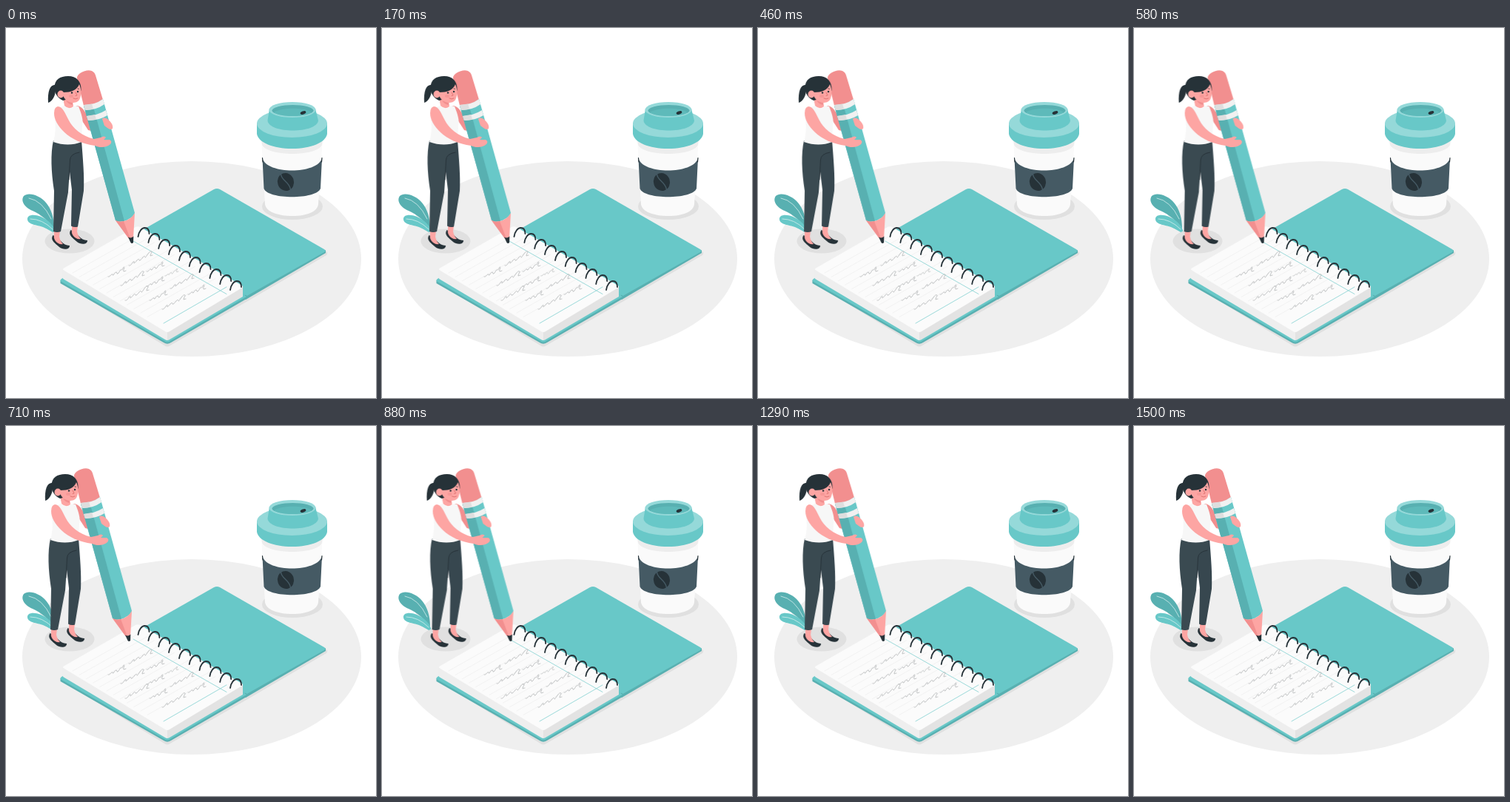
An HTML page without scripts that plays this animation: 500 px wide and 500 px high, repeating every 1540 ms.

```html
<!DOCTYPE html>
<html lang="en">
<head>
<meta charset="utf-8">
<title>Writing in a notebook</title>
<style>
  html, body { margin: 0; width: 100%; height: 100%; overflow: hidden; background: #fff; }
  svg { display: block; width: 100%; height: 100%; }

  .teal { fill: #68c8c8; }
  .teal-dark { fill: #58b0b1; }
  .teal-light { fill: #95d9d9; }
  .ink { fill: #263238; }
  .skin { fill: #fda5a3; }
  .skin-dark { fill: #f28f8f; }
  .shadow { fill: #e0e0e0; }
  .line { fill: none; stroke-linecap: round; stroke-linejoin: round; }
  .ring { stroke: #263238; stroke-width: 1.8; }
  .script { stroke: #c2c4c5; stroke-width: 1; }
  .rule { stroke: #eeeeee; stroke-width: .7; }
  .margin { stroke: #9bdada; stroke-width: 1; }

  .writer { animation: shake 1540ms ease-in-out infinite; }

  @keyframes shake {
    0%, 94.7%, 100% { transform: translateX(0); }
    7%, 85% { transform: translateX(-1px); }
    16.8%, 75.2% { transform: translateX(2px); }
    26.5%, 46%, 65.5% { transform: translateX(-4px); }
    36.2%, 55.7% { transform: translateX(4px); }
  }
</style>
</head>
<body>
<svg viewBox="0 0 500 500">
  <defs>
    <path id="long" class="line script" d="M0 0c2 1 4-2 5-4s3-2 2 0 2 0 4-3 3-1 3 0 3-1 5-4 3-1 3 0 2-2 4-5 4-4 5-3-2 3-2 6q2-1 3-1"/>
    <path id="short" class="line script" d="M0 0c2 1 3-2 5-3s1 2 2 1 2-4 4-4 0 3 2 2 2-4 4-5 2 1 3-2 2-2 2-1-2 3-1 5l3-1"/>
    <path id="ring" class="line ring" d="M0 0C1-7 5-12 9-12S15-9 15-4"/>
    <path id="rule" class="line rule" d="M90 331L182 279"/>
    <g id="rules3">
      <use href="#rule"/>
      <use href="#rule" x="9.2" y="5.4"/>
      <use href="#rule" x="18.4" y="10.8"/>
    </g>
    <g id="foot">
      <path class="ink" d="M63.500 280C59 287 67 291 72 296C77 300 86 300 86 294C80 294 75 290 71 284Z"/>
      <path class="skin" d="M65 272L73 274L72 282C73 287 75 290 77 292Q71 293 67 288Q64 284 65 280Z"/>
    </g>
  </defs>

  <ellipse cx="251" cy="312" rx="229" ry="132" fill="#efefef"/>

  <!-- Plant -->
  <path class="teal-dark" d="M65 271C65 256 61 244 54 236C46 226 30 221 24 227C19 234 26 243 36 247C47 252 57 260 65 271Z"/>
  <path class="teal" d="M67 278C66 267 57 259 47 255C38 251 28 252 29 259C30 266 42 266 50 269C57 272 61 275 67 278Z"/>
  <path class="line" stroke="#d5eeee" stroke-width=".8" d="M31 230Q49 233 61 258M33 258Q49 258 63 272"/>
  <ellipse class="shadow" cx="86" cy="288" rx="33.5" ry="16.5"/>

  <!-- Cup -->
  <g>
    <ellipse class="shadow" cx="387" cy="241" rx="41" ry="18"/>
    <path fill="#fafafa" d="M345 148L350 238C351 248 367 254 387 254S421 248 422 238L428 148Z"/>
    <path fill="#ededed" d="M345 150L346 158C354 174 420 174 427 158L428 150Z"/>
    <path fill="#455a64" d="M346.500 176C352 198 421 198 427 176L425 217C419 232 354 232 348.500 217Z"/>
    <path class="line" stroke="#263238" stroke-width="1.200" d="M346.500 175.500L347 181M427 175.500L426.500 181"/>
    <g transform="rotate(-18 378 208)">
      <ellipse class="ink" cx="378" cy="208" rx="11" ry="12"/>
      <path class="line" stroke="#455a64" stroke-width="1.500" d="M375 196C373 205 383 209 381 220"/>
    </g>
    <path class="teal" d="M339 128V143C341 155 361 163 386.500 163S432 155 434 143V128Z"/>
    <ellipse class="teal-light" cx="386.500" cy="129" rx="47.500" ry="19"/>
    <path class="teal" d="M356 109L353.500 125C355 143 420 143 422 125L418 109Z"/>
    <ellipse class="teal-light" cx="387" cy="110.500" rx="31.500" ry="10.500"/>
    <ellipse class="teal-dark" cx="387.500" cy="111.500" rx="28" ry="7.500"/>
    <path class="teal" d="M362 114C372 107 404 107 413 114C404 121 371 121 362 114Z" opacity=".4"/>
    <ellipse class="ink" cx="401.500" cy="114.500" rx="4" ry="2" transform="rotate(-20 401.500 114.500)"/>
  </g>

  <!-- Notebook -->
  <g>
    <path class="shadow" d="M74 344L214 429Q218 432 222 429L325 370L433 307Q436 304 432 301L320 360Z"/>
    <path class="teal-dark" d="M186 272L320 360L432 300V304L324 367L318 363Z"/>
    <path class="teal" d="M186 272L281 218Q285 216 289 218L430 299Q433 301 430 303L322 364Z"/>
    <path class="teal-dark" d="M73.500 341V345L213 425Q218 428.500 223 425L325 366V361Z"/>
    <path class="teal" d="M78 337L75 339Q72 341 75 343L214 423Q218 426 222 423L325 363L318 358Z"/>
    <path fill="#eeeeee" d="M76.500 326V337Q76.500 338.500 78 339.500L215 421Q216.500 422 218 422V410Z"/>
    <path fill="#e3e3e3" d="M218 410V422Q219.500 422 221 421L320 363V349Z"/>
    <path fill="#fbfbfb" d="M79 324L175 269Q179 267 183 270L319 348Q321 350 319 351L221 410Q218 412 215 410L79 328Q75 326 79 324Z"/>
    <use href="#rules3"/>
    <use href="#rules3" x="27.600" y="16.200"/>
    <use href="#rules3" x="55.200" y="32.400"/>
    <use href="#rules3" x="82.800" y="48.600"/>
    <path class="line margin" d="M172 288L298 359.500M213 399L298 350"/>
    <use href="#short" x="138" y="336"/>
    <use href="#long" x="166" y="321"/>
    <use href="#long" x="155" y="348"/>
    <use href="#short" x="190" y="329"/>
    <use href="#long" x="161" y="368"/>
    <use href="#short" x="190" y="349"/>
    <use href="#short" transform="translate(215 335) scale(.75)"/>
    <use href="#short" x="194" y="368"/>
    <use href="#long" x="222" y="352"/>
    <use href="#long" x="211" y="380"/>
    <use href="#short" x="246" y="360"/>
    <use href="#ring" x="178.500" y="282"/>
    <use href="#ring" x="192.400" y="290"/>
    <use href="#ring" x="206.200" y="298"/>
    <use href="#ring" x="220" y="306"/>
    <use href="#ring" x="234" y="314"/>
    <use href="#ring" x="247.700" y="322"/>
    <use href="#ring" x="261.500" y="330"/>
    <use href="#ring" x="275.400" y="338"/>
    <use href="#ring" x="289.200" y="346"/>
    <use href="#ring" x="303" y="354"/>
  </g>

  <g class="writer">
    <!-- Far arm -->
    <path class="skin-dark" d="M95 105C103 105 107 113 111 121L119 140L111 138L100 121Z"/>

    <!-- Pencil -->
    <path class="skin-dark" d="M96 68C95 62 108 55 116 58Q120 60 121 64L131 97Q119 106 105 105Z"/>
    <path class="teal" d="M105 105Q121 104 131 96L174 250Q171 256 166 258Q161 262 156 261Q151 263 148 260Z"/>
    <path class="teal-dark" d="M105 105L117 103L160 261Q151 263 148 260Z"/>
    <path fill="#f1f1f1" d="M105 104Q120 104 131 96L133 103Q122 111 107 111ZM109 119Q124 118 135 111L137 118Q126 125 111 125Z"/>
    <path fill="#dedede" d="M105 104L116 102.500L118 109.500L107 111ZM109 119L120 117L122 123.500L111 125Z"/>
    <path class="skin" d="M148 260Q153 263 159 261Q169 259 174 250L172 284L165.500 284Z"/>
    <path class="skin-dark" d="M148 260Q153 263 159 261L168 285L165.500 284Z"/>
    <path class="ink" d="M165 282.500Q169 285 172.300 281.500L172 290Q170 292 168.500 290Z"/>

    <!-- Far hand -->
    <path class="skin" d="M130 123C133 119 139 124 142 128Q145 132 144 136Q141 138.500 137 135L133 132Z"/>

    <!-- Legs -->
    <use href="#foot" x="24" y="-7"/>
    <use href="#foot"/>
    <path fill="#37474f" d="M80 153L102 152C104 178 106 200 105 220L97 268.500Q92 270 88 267.500L89 219L85 186Z"/>
    <path fill="#3a4a51" d="M64 152Q82 158 101 153L99 168Q87 170 87 178L84 222L74 275Q69 277 64 275L65 220C61 194 60 170 64 152Z"/>
    <path class="line" stroke="#263238" stroke-width=".9" d="M99 168Q87 170 86.500 178L85 205"/>

    <!-- Torso -->
    <path fill="#f7f7f7" d="M72 108L78 105Q86 112 93 105L98 106C102 116 105 125 103 132L102 154Q84 161 64 154C68 140 67 127 65 117Z"/>
    <path class="skin" d="M77 94L90 98L91 106Q85 111 79 105Z"/>
    <path class="skin-dark" d="M81 98L90 101V104Q84 103 81 98Z"/>

    <!-- Head -->
    <path class="ink" d="M69 77C60 75 56 84 57 101C63 99 67 91 67 83Z"/>
    <path class="ink" d="M65.500 80C65.500 70 73 65 84 65C95 65 102 72 101.500 84L98 92L77 98C69 94 65.500 88 65.500 80Z"/>
    <path class="skin" d="M77 87C88 87 96 84 99 76C102 83 102 90 100 95C98 101 91 102 86 100C80 98 77 93 77 89Z"/>
    <ellipse class="skin" cx="74" cy="89.500" rx="4.500" ry="5"/>
    <ellipse class="skin-dark" cx="88" cy="92" rx="3" ry="2" opacity=".6"/>
    <circle class="ink" cx="89" cy="87.500" r="1.200"/>
    <circle class="ink" cx="97" cy="86" r="1.200"/>
    <path class="line" stroke="#263238" stroke-width=".8" d="M86 84.500L89.500 83M97 82L98.500 82.300"/>
    <path class="line" stroke="#dd6f6d" stroke-width=".9" d="M94 87L96 91L94 91.500M91 95Q94 97 97 95"/>

    <!-- Near arm -->
    <path class="skin" d="M70 106C77 106 80 116 85 125C90 135 102 146 119 150L128 148Q133 145 135 148L132 151L140 151Q144 153 141 157C136 162 126 162 120 159C104 157 88 150 79 141C70 132 65 124 65 115Q65 107 70 106Z"/>
  </g>
</svg>
</body>
</html>
```
